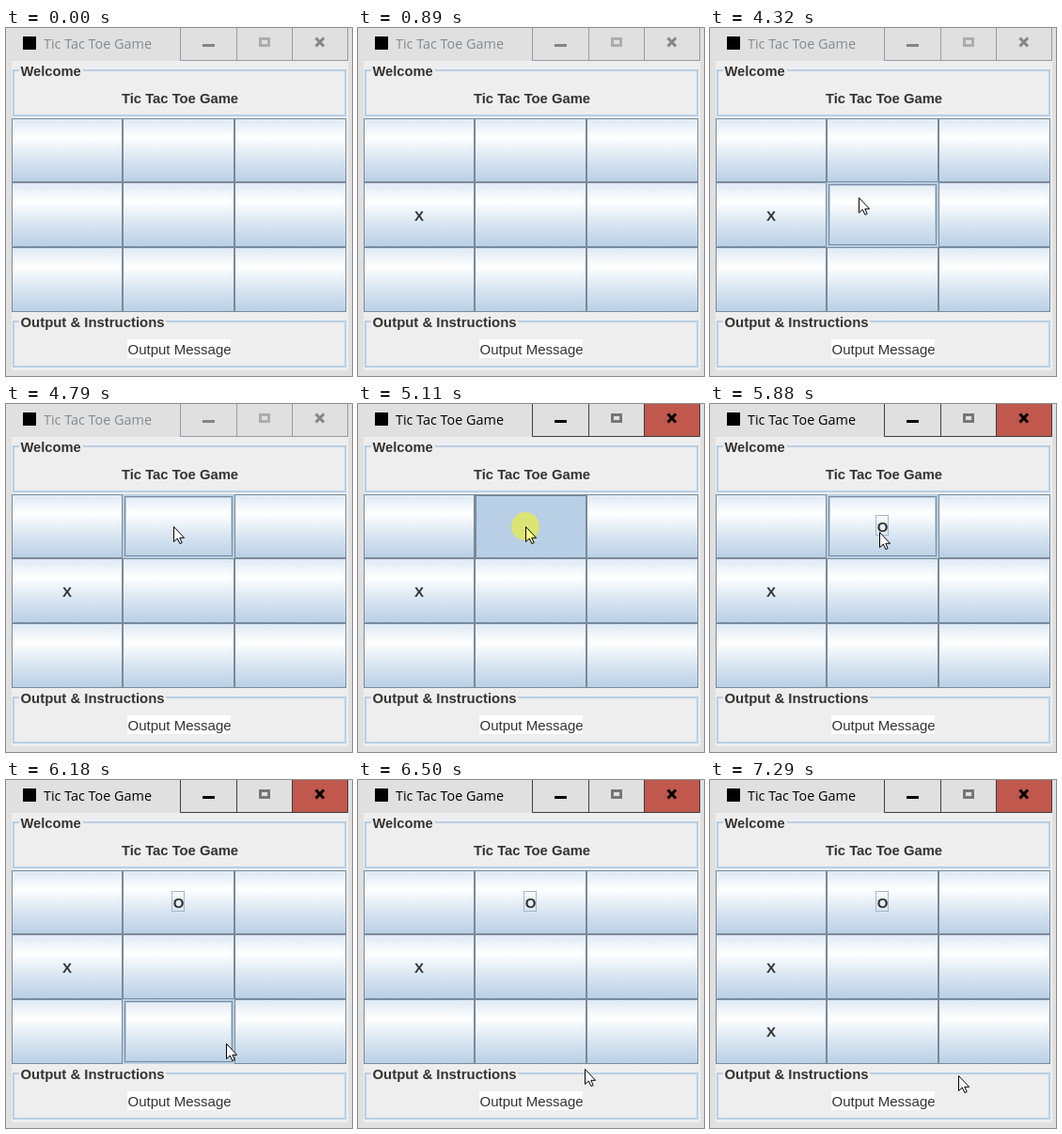
Animation of 368 by 370 pixels, one loop 8000 ms. Source, as an HTML page:

```html
<!DOCTYPE html>
<html lang="en">
<head>
<meta charset="utf-8">
<title>Tic Tac Toe Game</title>
<style>
  html, body { margin: 0; width: 100%; height: 100%; overflow: hidden; background: #e0e0e0; }
  svg { display: block; }
  text { font: bold 15px "Liberation Sans", Arial, sans-serif; fill: #333; }
  .mid { text-anchor: middle; }
  .line { fill: none; stroke: #b8cfe5; stroke-width: 2; }
  #bar { --ink: #858585; --edge: #949a9f; --title: #858991; --off: #acacac; --close: none; }
  #bar.active { --ink: #000; --edge: #3d3d3d; --title: #000; --off: #777; --close: #c1584e; }
  #bar text { font: 14.4px "Open Sans", "Noto Sans", sans-serif; fill: var(--title); }
  .box { fill: none; stroke: var(--edge); }
  .cell rect { fill: none; }
  .cell .face { fill: url(#steel); }
  .cell .edge { stroke: #7a8a99; }
  .cell .glow, .cell .press, .cell .focus { display: none; }
  .hover .glow { display: inline; }
  .hover .edge { display: none; }
  .pressed .press { display: inline; }
  .pressed .face { fill: #b8cfe5; }
  .focused .focus { display: inline; stroke: #a3b8cc; }
</style>
</head>
<body>
<svg width="368" height="370" viewBox="0 0 368 370">
  <defs>
    <linearGradient id="steel" x2="0" y2="1">
      <stop offset="0" stop-color="#dde8f3"/>
      <stop offset=".3" stop-color="#fff"/>
      <stop offset=".6" stop-color="#dde8f3"/>
      <stop offset="1" stop-color="#b8cfe5"/>
    </linearGradient>
  </defs>
  <rect width="368" height="370" fill="#e0e0e0"/>
  <rect x="6" y="35" width="358" height="329" fill="#eee"/>

  <g id="bar">
    <rect x="18" y="9" width="14" height="14" fill="#000"/>
    <text x="40" y="22">Tic Tac Toe Game</text>
    <rect x="304.5" y="-1" width="59" height="35.5" style="fill:var(--close)"/>
    <path class="box" d="M185.5 0V34.5H363.5V0M245.5 0V34M304.5 0V34"/>
    <path d="M209 18.5H222" style="stroke:var(--ink)" stroke-width="3"/>
    <rect x="270.5" y="11.5" width="9" height="7" fill="none" style="stroke:var(--off)" stroke-width="3"/>
    <path d="M329.5 10.5L338 19.5M338 10.5L329.5 19.5" style="stroke:var(--ink)" stroke-width="3"/>
  </g>

  <path class="line" d="M14 45H8V93H361V45H82"/>
  <text x="15.5" y="51" style="font-size:14.7px">Welcome</text>
  <text class="mid" x="185" y="80" style="font-size:14.8px">Tic Tac Toe Game</text>

  <g id="board"></g>

  <path class="line" d="M14 312H8V360H361V312H170"/>
  <text x="15.5" y="318" style="font-size:14.9px">Output &amp; Instructions</text>
  <rect x="129" y="331" width="110" height="20" fill="#fff"/>
  <text x="129.5" y="347" style="font-weight:normal">Output Message</text>

  <circle id="spot" cx="178" cy="130" r="15" fill="#dce474"/>
  <path id="cursor" d="M.5 .5V16.5L4.3 13 6.9 18.5 9.2 17.5 6.8 12.3H11.6Z" stroke="#000"/>
</svg>
<script>
const LOOP = 8000, CLICK = 5110, RELEASE = 5250;
const xs = [6, 124, 243, 362], ys = [96, 164, 233, 302];
const byId = id => document.getElementById(id);

// time, cursor x, cursor y, hovered cell
const moves = [
  [4320, 158, 180, 4], [4470, 126, 116, 1], [4620, 153, 112, 1],
  [4790, 178, 130, 1], [5880, 180, 136, 1], [6030, 212, 224, 4],
  [6180, 234, 280, 7], [6350, 238, 297, 7], [6500, 241, 307, -1],
  [6650, 245, 312, -1], [6820, 257, 313, -1], [6970, 264, 313, -1],
  [7140, 264, 314, -1]
];
// cell, mark, time it appears
const marks = [[3, 'X', 890], [1, 'O', RELEASE], [6, 'X', 7290]];

function ring(x, y, w, h, inset, attrs) {
  const d = inset + .5;
  return `<rect x="${x + d}" y="${y + d}" width="${w - 2 * d}" height="${h - 2 * d}" ${attrs}/>`;
}

function cellMarkup(i) {
  const c = i % 3, r = i / 3 | 0, x = xs[c], y = ys[r];
  const w = xs[c + 1] - x, h = ys[r + 1] - y, cx = x + w / 2;
  return `<g class="cell">
    <rect class="face" x="${x}" y="${y}" width="${w}" height="${h}"/>
    ${ring(x, y, w, h, 0, 'class="edge"')}
    <g class="glow">
      ${ring(x, y, w, h, .5, 'stroke="#b8cfe5" stroke-width="2"')}
      ${ring(x, y, w, h, 3, 'stroke="#b8cfe5"')}
      ${ring(x, y, w, h, 2, 'stroke="#7a8a99"')}
    </g>
    <path class="press" fill="#7a8a99" d="M${x} ${y}h${w}v2h${2 - w}v${h - 2}h-2z"/>
    <rect class="focus" x="${cx - 7}" y="${y + 22.5}" width="13" height="21"/>
    <text class="mid" x="${cx}" y="${[136, 205, 273][r]}"></text>
  </g>`;
}

byId('board').innerHTML = [...Array(9).keys()].map(cellMarkup).join('');
const cells = [...byId('board').children];
const labels = cells.map(cell => cell.querySelector('text'));
const start = performance.now();

function draw(now) {
  const t = Math.max(0, now - start) % LOOP;
  const pressed = t >= CLICK && t < RELEASE;
  const move = moves.filter(m => m[0] <= t).pop();
  const hovered = move ? move[3] : -1;

  byId('bar').classList.toggle('active', t >= CLICK);
  cells.forEach((cell, i) => {
    cell.classList.toggle('hover', i === hovered && !pressed);
    cell.classList.toggle('pressed', i === 1 && pressed);
    cell.classList.toggle('focused', i === 1 && t >= RELEASE);
  });
  for (const [i, mark, at] of marks) labels[i].textContent = t >= at ? mark : '';

  byId('spot').style.display = pressed ? '' : 'none';
  const cursor = byId('cursor');
  cursor.style.display = move ? '' : 'none';
  cursor.setAttribute('fill', pressed ? '#ffff8c' : '#fff');
  if (move) cursor.setAttribute('transform', `translate(${move[1]} ${move[2]})`);
  requestAnimationFrame(draw);
}
draw(start);
</script>
</body>
</html>
```
